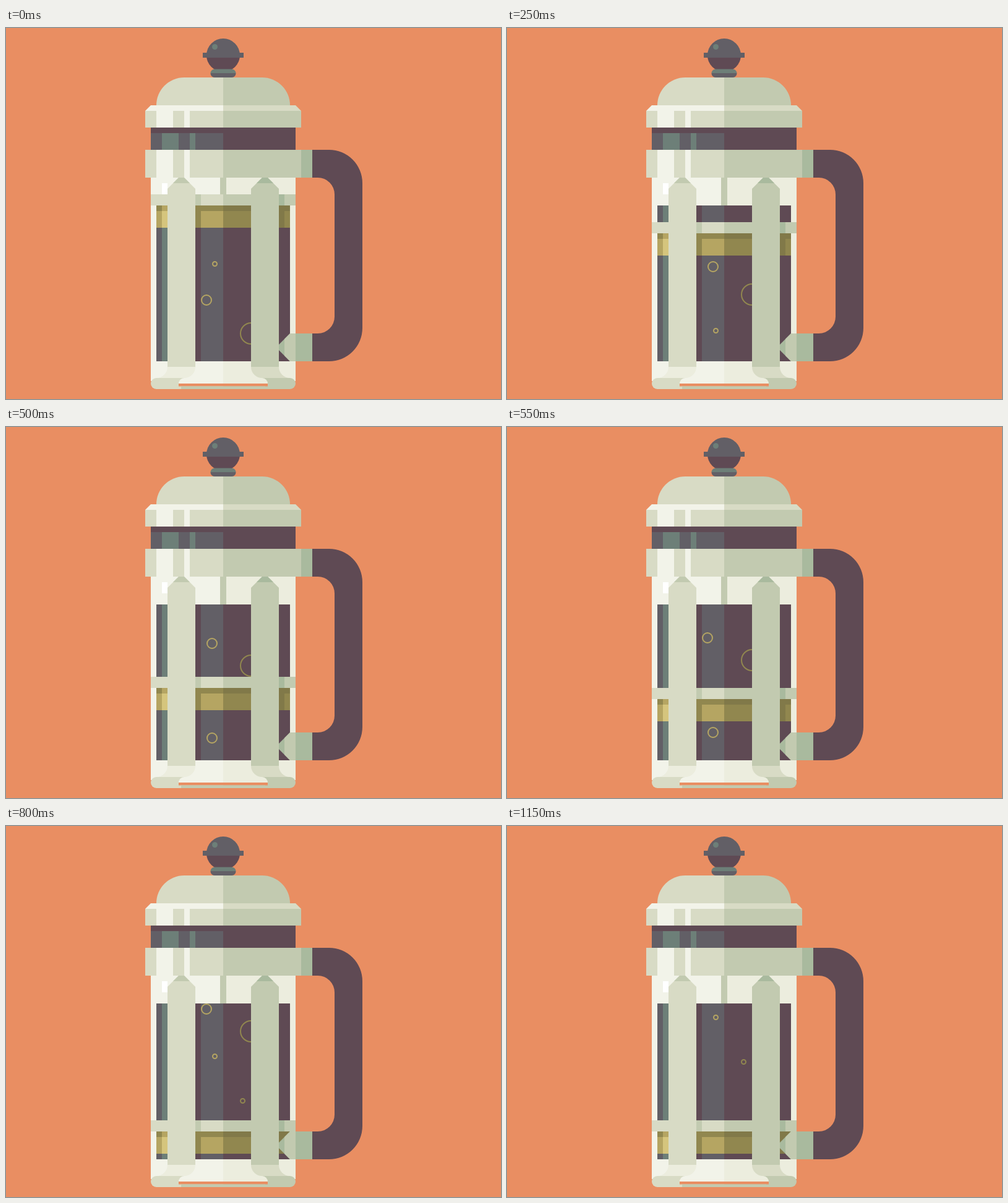
An HTML page with a canvas for the animation above (1200 ms loop, 800x600 px).

```html
<!DOCTYPE html>
<html>
<head>
<meta charset="utf-8">
<title>French press</title>
<style>
html, body { margin: 0; height: 100%; overflow: hidden; background: #e98e62; }
canvas { display: block; }
</style>
</head>
<body>
<canvas id="stage" width="800" height="600"></canvas>
<script>
const ctx = document.getElementById('stage').getContext('2d');
const UNIT = 9, STEP = 50, STEPS = 24;
const C = {
  bg: '#e98e62', white: '#ffffff', cream: '#f2f3e9', ivory: '#ecedde',
  pale: '#d8dbc5', sage: '#c2cab0', moss: '#a9ba9e',
  plum: '#5f4a54', gray: '#625f66', teal: '#6d7f78',
  straw: '#d5c57d', gold: '#b5a562', olive: '#91874f', dark: '#817949'
};

// Each bubble: radius, colour, then [step, x, y] keys.
const bubbles = [
  [4.5, C.gold, [0, 337.5, 381.5], [5, 337.5, 336.5]],
  [4.5, C.gold, [0, 337.5, 543.5], [5, 337.5, 489.5], [8, 337.5, 462.5], [13, 337.5, 399.5], [23, 337.5, 309.5]],
  [4.5, C.olive, [12, 382.5, 480.5], [23, 382.5, 381.5]],
  [9, C.gold, [0, 324, 440], [5, 333, 386], [8, 333, 368], [13, 324, 323], [19, 324, 269]],
  [9, C.gold, [5, 324, 548], [8, 324, 521], [10, 333, 503], [13, 333, 476]],
  [18, C.olive, [0, 396, 494], [5, 396, 431], [23, 396, 269]]
];

function rect(x, y, w, h, color) {
  ctx.fillStyle = color;
  ctx.fillRect(x, y, w, h);
}

// Row of side-by-side colours: x, colour, x, colour, ..., end x.
function band(y, h, ...stops) {
  for (let i = 0; i + 2 < stops.length; i += 2)
    rect(stops[i], y, stops[i + 2] - stops[i], h, C[stops[i + 1]]);
}

function shape(d, color) {
  ctx.fillStyle = color;
  ctx.fill(new Path2D(d));
}

function clipped(x, y, w, h, draw) {
  ctx.save();
  ctx.beginPath();
  ctx.rect(x, y, w, h);
  ctx.clip();
  draw();
  ctx.restore();
}

// Fill a path with one colour left of the middle and another right of it.
function halves(d, left, right) {
  clipped(0, 0, 351, 600, () => shape(d, left));
  clipped(351, 0, 449, 600, () => shape(d, right));
}

function disc(x, y, r, color) {
  ctx.fillStyle = color;
  ctx.beginPath();
  ctx.arc(x, y, r, 0, 7);
  ctx.fill();
}

const snap = (a, b, f) => a + UNIT * Math.round((b - a) / UNIT * f);

function drawBubble([r, color, ...keys], k) {
  const i = keys.findIndex((key, n) => n && k >= keys[n - 1][0] && k <= key[0]);
  if (i < 0) return;
  const [k0, x0, y0] = keys[i - 1], [k1, x1, y1] = keys[i];
  const f = (k - k0) / (k1 - k0);
  ctx.strokeStyle = color;
  ctx.lineWidth = 2;
  ctx.beginPath();
  ctx.arc(snap(x0, x1, f), snap(y0, y1, f), r - 1, 0, 7);
  ctx.stroke();
}

function drawLid() {
  clipped(300, 0, 100, 48, () => disc(351, 44, 27, C.gray));
  clipped(300, 48, 100, 30, () => disc(351, 44, 27, C.plum));
  rect(318, 40, 66, 8, C.gray);
  disc(337.5, 30.5, 4.5, C.teal);
  const neck = 'M337 66.5H365a6.5 6.75 0 0 1 0 13.5H337a6.5 6.75 0 0 1 0-13.5Z';
  clipped(320, 60, 60, 13, () => shape(neck, C.teal));
  clipped(320, 73, 60, 7, () => shape(neck, C.gray));

  halves('M243 125a45 45 0 0 1 45-45H414a45 45 0 0 1 45 45Z', C.pale, C.sage);
  halves('M234 125H468L477 134H225Z', C.cream, C.pale);
  const shine = [225, 'pale', 243, 'cream', 270, 'pale', 288, 'cream', 297, 'pale', 351, 'sage', 477];
  band(134, 27, ...shine);
  band(161, 9, 234, 'plum', 468);
  band(170, 27, 234, 'gray', 252, 'teal', 279, 'gray', 297, 'teal', 306, 'gray', 351, 'plum', 468);
  band(197, 45, ...shine, 'moss', 495);
}

function drawPlunger(y) {
  band(y, 18, 234, 'pale', 306, 'sage', 315, 'pale', 351, 'sage', 441, 'moss', 450, 'sage', 468);
  band(y + 18, 9, 243, 'olive', 252, 'gold', 261, 'olive', 351, 'dark', 459);
  band(y + 27, 27, 243, 'gold', 252, 'straw', 261, 'olive', 315, 'gold', 351, 'olive', 441, 'dark', 450, 'olive', 459);
}

function drawLeg(x, color, tip) {
  shape(`M${x} 548V260l18-18h9l18 18V548Z`, color);
  shape(`M${x + 9} 251l9-9h9l9 9Z`, tip);
}

function drawBase() {
  halves('M243 566H459a9 9 0 0 1 0 18H243a9 9 0 0 1 0-18Z', C.pale, C.sage);
  halves('M288 566H414a9 9 0 0 1 9 9H279a9 9 0 0 1 9-9Z', C.cream, C.ivory);
  rect(279, 575, 144, 4.5, C.bg);
  rect(283, 579.5, 136, 4.5, C.sage);
  shape('M261 548H306a18 18 0 0 1-18 18H243a18 18 0 0 0 18-18Z', C.ivory);
  shape('M441 548H396a18 18 0 0 0 18 18H459a18 18 0 0 1-18-18Z', C.pale);
}

function drawHandle() {
  shape('M495 197H522a54 54 0 0 1 54 54V485a54 54 0 0 1-54 54H495V494H504a27 27 0 0 0 27-27V269a27 27 0 0 0-27-27H495Z', C.plum);
  clipped(441, 494, 54, 45, () => {
    const joint = 'M441 512L459 494H495V539H459L441 521Z';
    shape(joint, C.moss);
    clipped(450, 494, 18, 45, () => shape(joint, C.sage));
  });
}

function draw(k) {
  rect(0, 0, 800, 600, C.bg);
  drawLid();
  band(242, 329, 234, 'cream', 351, 'ivory', 468);
  rect(252, 251, 9, 18, C.white);
  rect(346, 242, 10, 45, C.sage);
  band(287, 252, 243, 'gray', 252, 'teal', 261, 'plum', 315, 'gray', 351, 'plum', 459);
  clipped(243, 287, 216, 252, () => bubbles.forEach(b => drawBubble(b, k)));
  // Slow start, double speed, slow finish, then rest.
  drawPlunger(269 + UNIT * Math.min(23, Math.max(k, 2 * k - 5), k + 8));
  drawLeg(261, C.pale, C.sage);
  drawLeg(396, C.sage, C.moss);
  drawBase();
  drawHandle();
}

const start = performance.now();
function tick() {
  draw(Math.floor((performance.now() - start) / STEP) % STEPS);
  requestAnimationFrame(tick);
}
tick();
</script>
</body>
</html>
```
